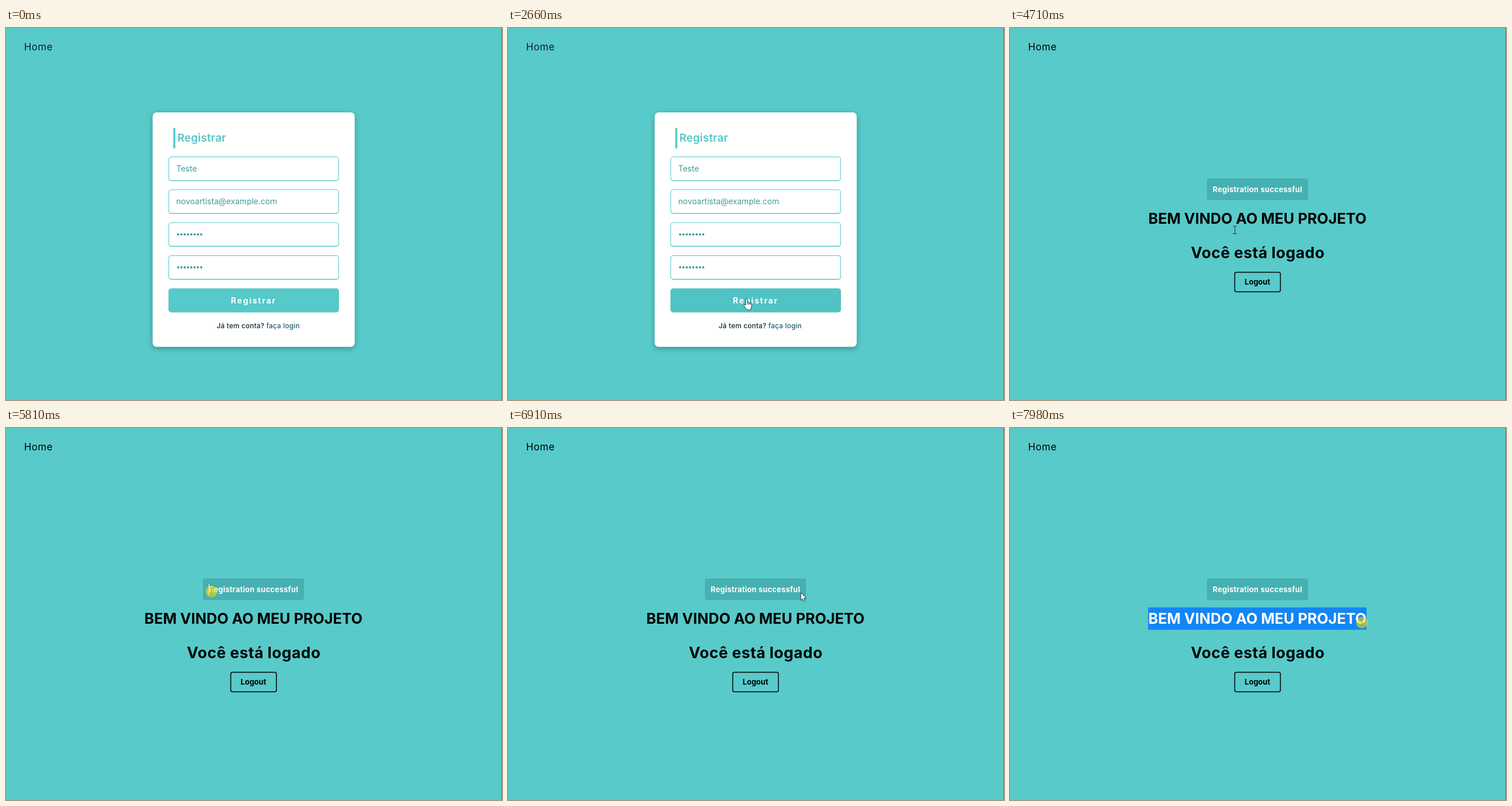
Write an HTML page that moves like this. It is 864 px wide and 648 px high and loops after 8000 ms.

```html
<!DOCTYPE html>
<html lang="pt">
<head>
<meta charset="utf-8">
<title>Registrar</title>
<style>
html, body { margin: 0; width: 100%; height: 100%; overflow: hidden; background: #58caca; }
svg { display: block; width: 864px; height: 648px; font-family: Inter, "Open Sans", sans-serif; }
.mid { text-anchor: middle; }
.bold { font-weight: 700; }
.card { fill: #fff; filter: drop-shadow(0 3px 5px rgba(0, 0, 0, .3)); }
.entry { font-size: 14px; fill: #449a99; }
.hint { font-size: 12px; font-weight: 500; letter-spacing: .2px; }
.flash { font-size: 13px; letter-spacing: .27px; fill: #fff; }
.head { font-size: 25.6px; }
.sel { fill: #1485f5; }
</style>
</head>
<body>
<svg viewBox="0 0 864 648">
  <defs>
    <clipPath id="headClip"><rect id="headCut" x="240.5" y="312.5" height="39"/></clipPath>
  </defs>
  <rect width="864" height="648" fill="#58caca"/>
  <rect x="863" width="1" height="648" fill="#3a8a8c"/>
  <text id="home" x="31.5" y="38.5" font-size="17" letter-spacing=".6">Home</text>

  <g id="form">
    <rect class="card" x="255.5" y="147" width="352" height="408.5" rx="7"/>
    <rect x="291.5" y="174" width="3.4" height="35.5" fill="#56c8c8"/>
    <text x="298.5" y="198" font-size="19" font-weight="600" letter-spacing=".2" fill="#56c8c8">Registrar</text>
    <g id="fields"></g>
    <text class="entry" x="296.5" y="249.5">Teste</text>
    <text class="entry" x="296.5" y="307">novoartista@example.com</text>
    <rect id="button" x="283" y="453.5" width="297" height="42" rx="5"/>
    <text class="mid bold" x="431.5" y="480" font-size="14" letter-spacing="1.9" fill="#fff">Registrar</text>
    <text class="hint" x="367" y="523" fill="#122a33">Já tem conta?</text>
    <text class="hint" x="453.5" y="523" fill="#1f5d70">faça login</text>
  </g>

  <g id="welcome">
    <rect x="343" y="262" width="176" height="38" rx="4" fill="#47b0b1"/>
    <rect id="flashSel" class="sel" x="352" y="271" height="21"/>
    <text id="flash" class="flash mid bold" x="431" y="286">Registration successful</text>
    <rect id="caret" x="353" y="272" width="1" height="19" fill="#fff"/>
    <text id="head" class="head mid bold" x="431" y="341">BEM VINDO AO MEU PROJETO</text>
    <g clip-path="url(#headClip)">
      <rect class="sel" x="240" y="312" width="383" height="40"/>
      <text class="head mid bold" x="431" y="341" fill="#fff">BEM VINDO AO MEU PROJETO</text>
    </g>
    <text class="mid bold" x="431.5" y="401" font-size="26.8" letter-spacing=".5">Você está logado</text>
    <rect x="391.5" y="425.5" width="79.5" height="34" rx="3" fill="none" stroke="#000" stroke-width="1.5"/>
    <text class="mid bold" x="431" y="447" font-size="13">Logout</text>
  </g>

  <g id="cursor">
    <g stroke-linejoin="round" stroke-linecap="round">
      <path id="arrow" d="M0 0V13.4L3.1 10.6L5.2 15.3L7.4 14.3L5.4 9.8H9.6Z" fill="#fff" stroke="#1d3540"/>
      <path id="beam" d="M-3 -6.5H3M0 -6.5V6.5M-3 6.5H3" fill="none" stroke="#3c4a4d" stroke-width="1.2"/>
      <g id="hand" stroke="#1d3540">
        <path d="M-2 10V1.5A1.7 1.7 0 0 1 1.4 1.5V6L6.8 7.4Q8.8 8 8.6 10.4L7.8 15L6.4 19H.2L-4.5 12.8Q-5.6 10.8 -4.2 10Q-3 9.4 -2 10Z" fill="#fff"/>
        <path d="M1.4 6V9.5M4 6.8V9.8M6.4 7.4V10.2" fill="none" stroke-width=".9"/>
      </g>
    </g>
    <circle id="press" r="10" fill="rgba(248, 226, 20, .58)"/>
  </g>
</svg>
<script>
const LOOP = 8000, PAGE_SWAP = 4300, FIELDS = 4, PITCH = 57.3;
const $ = id => document.getElementById(id);
const show = (id, on) => $(id).style.display = on ? "" : "none";
const clamp = v => Math.max(0, Math.min(1, v));
const easeOut = k => 1 - (1 - k) ** 2;
const fieldTop = row => 224.5 + row * PITCH;

// Pointer moves: start, end and the curve travelled; it rests in between
const moves = [
  [80, 880, "M729 588L442 404Q300 300 353 256"],
  [940, 1740, "M353 256L478 301Q505 315 402 349"],
  [1810, 2600, "M402 349Q355 420 416 472"],
  [2660, 2870, "M416 472L419 478"],
  [3810, 4110, "M419 478L391 352"],
  [4710, 5510, "M391 352L497 331Q500 265 363 278"],
  [5550, 5700, "M363 278L358 285"],
  [5840, 6230, "M358 285L510 287"],
  [6950, 7350, "M510 287L251 334"],
  [7480, 7980, "M251 334L613 339"]
].map(([from, to, d]) => {
  const curve = document.createElementNS("http://www.w3.org/2000/svg", "path");
  curve.setAttribute("d", d);
  return { from, to, curve, length: curve.getTotalLength() };
});
const presses = [[3340, 3490], [5780, 6540], [6780, 6880], [7400, LOOP]];

// Fields have a thicker bottom edge; the last two hold masked passwords
for (let row = 0, svg = ""; row < FIELDS; row++) {
  const y = fieldTop(row);
  svg += `<rect x="283" y="${y - .5}" width="297" height="42.5" rx="5" fill="#56c8c8"/>
    <rect x="284" y="${y + .5}" width="295" height="40" rx="4" fill="#fff"/>`;
  for (let i = 0; row > 1 && i < 8; i++)
    svg += `<circle cx="${299.8 + i * 5.75}" cy="${y + 20.5}" r="1.9" fill="#3b959b"/>`;
  $("fields").innerHTML = svg;
}

function pointAt(t) {
  const m = moves.findLast(m => m.from <= t) || moves[0];
  return m.curve.getPointAtLength(m.length * easeOut(clamp((t - m.from) / (m.to - m.from))));
}

function cursorKind(t, x, y) {
  const inside = (l, top, r, b) => x >= l && x < r && y >= top && y < b;
  if (t >= PAGE_SWAP)
    return inside(241, 313, 622, 352) || inside(352, 271, 510, 292) ? "beam" : "arrow";
  if (inside(283, 453, 580, 496)) return "hand";
  const overField = inside(283, fieldTop(0), 580, fieldTop(FIELDS)) && (y - fieldTop(0)) % PITCH < 42;
  const loading = t > 4080;
  return overField && !loading ? "beam" : "arrow";
}

// Width of the selection from left up to the letter under x
function selected(text, left, x) {
  let right = left;
  for (let i = 0; i < text.getNumberOfChars(); i++) {
    const c = text.getExtentOfChar(i);
    if (c.x + c.width / 2 < x) right = c.x + c.width;
  }
  return right - left;
}

function draw(t) {
  const { x, y } = pointAt(t), kind = cursorKind(t, x, y);
  const welcome = t >= PAGE_SWAP;
  show("form", !welcome);
  show("welcome", welcome);
  $("home").setAttribute("fill", welcome ? "#000" : "#101d2c");

  const hover = clamp((t - 2400) / 400) - clamp((t - 3880) / 400);
  $("button").setAttribute("fill", `rgb(${86 - 7 * hover}, ${201 - 9 * hover}, ${201 - 8 * hover})`);

  const flashOn = t > 5840 && t < 6780, headOn = t >= 7480;
  show("caret", t >= 5780 && t <= 5840);
  $("flashSel").setAttribute("width", flashOn ? selected($("flash"), 352, x) : 0);
  $("headCut").setAttribute("width", headOn ? selected($("head"), 240.5, x) : 0);

  show("cursor", t >= 80);
  $("cursor").setAttribute("transform", `translate(${x} ${y})`);
  for (const id of ["arrow", "beam", "hand"]) show(id, id === kind);
  show("press", presses.some(([from, to]) => t >= from && t < to));
}

const start = performance.now();
function frame() {
  draw((performance.now() - start) % LOOP);
  requestAnimationFrame(frame);
}
frame();
</script>
</body>
</html>
```
